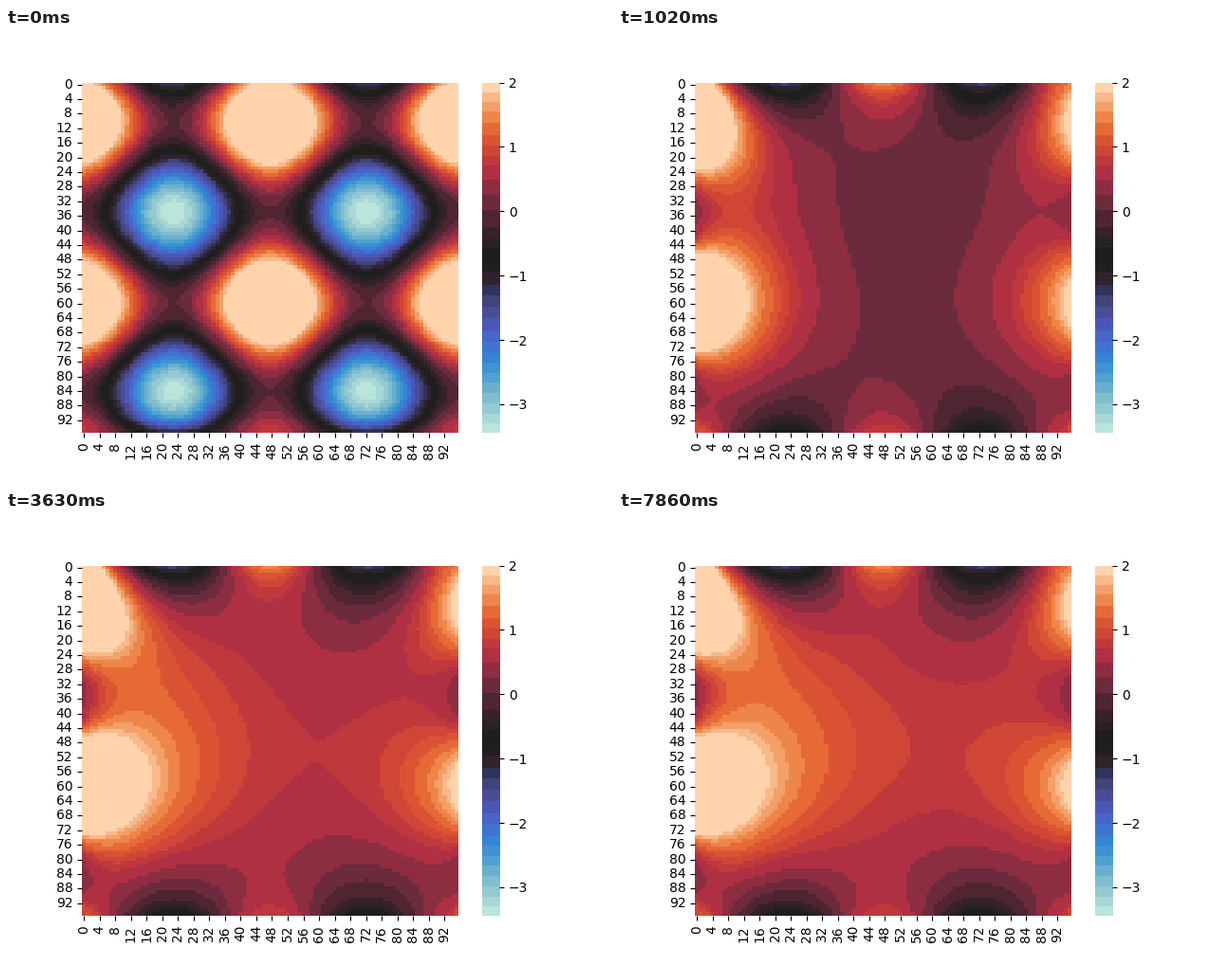
A matplotlib script that plays this animation: 640x480 px, repeating every 8000 ms.

```python
import numpy as np
import matplotlib.pyplot as plt
from matplotlib.animation import FuncAnimation
from matplotlib.colors import BoundaryNorm, ListedColormap

N = 96
VMIN, VMAX = -3.445, 2.0
LOOP_MS, INTERVAL, STEP_MS, LAST_STEP = 8000, 40, 30, 262
DIFFUSION, SUBSTEPS = 9.3, 40

COLORS = """b9e5da a8d8d5 94c9d0 7fbdcf 68b0ce 4fa2cf 3c94d1 3485d3 3f75d0
4866c8 4b57b7 494d98 42437a 30325a 30232b 231f21 1e1e1e 2a2125 36222a 4e2530
6b2b3c 8c2d41 b03043 bf383c d04636 da5433 e56a36 ee8649 f3a06a f9b98a
ffd4ac""".split()
EDGES = [VMIN, -3.3, -3.15, -2.99, -2.83, -2.67, -2.51, -2.35, -2.2, -2.03,
         -1.85, -1.66, -1.48, -1.31, -1.15, -0.95, -0.85, -0.55, -0.42, -0.25,
         0.02, 0.25, 0.49, 0.71, 0.86, 1.02, 1.18, 1.38, 1.55, 1.7, 1.84, VMAX]
# One edge more than colours is needed
assert len(EDGES) == len(COLORS) + 1

cells = np.arange(N)
phase = 4 * np.pi * (cells + 2) / 99
wave_x, wave_y = np.cos(phase), np.sin(phase)
from_end = N - 1 - cells

# Values the four sides settle to
LEFT = 2.5 + 2.5 * wave_y - 0.35 * np.cos(2 * phase)
LEFT *= 1 - 0.35 * np.exp(-from_end / 4)
RIGHT = 1.2 + 0.9 * wave_y
TOP = 0.05 + 1.37 * wave_x + 1.2 * np.exp(-(cells / 7) ** 2)
BOTTOM = 0.05 + 0.8 * wave_x + 0.25 * np.exp(-(cells / 5) ** 2)


def initial_field():
    u = 1.72 * (wave_x[None, :] + wave_y[:, None])
    u *= (1 - 0.4 * np.exp(-from_end / 3))[:, None]
    return u


def set_sides(u, start, settle):
    for side, goal in (
        (np.s_[0, :], TOP),
        (np.s_[-1, :], BOTTOM),
        (np.s_[:, -1], RIGHT),
        (np.s_[:, 0], LEFT),
    ):
        u[side] = goal + (start[side] - goal) * settle


def solve():
    """Heat equation, one stored field per step."""
    start = initial_field()
    u = start.copy()
    rate = DIFFUSION / SUBSTEPS
    fields = [u.copy()]
    for step in range(LAST_STEP):
        for sub in range(SUBSTEPS):
            set_sides(u, start, np.exp(-(step + sub / SUBSTEPS) / 2))
            u[1:-1, 1:-1] += rate * (
                u[:-2, 1:-1] + u[2:, 1:-1] + u[1:-1, :-2] + u[1:-1, 2:]
                - 4 * u[1:-1, 1:-1]
            )
        fields.append(u.copy())
    return fields


fields = solve()
cmap = ListedColormap(["#" + c for c in COLORS])
norm = BoundaryNorm(EDGES, cmap.N)
style = dict(cmap=cmap, norm=norm, aspect="auto", interpolation="nearest")


def shown(u):
    return np.clip(u, VMIN + 1e-6, VMAX - 1e-6)


plt.rcParams["font.family"] = "DejaVu Sans"
fig = plt.figure(figsize=(6.4, 4.8), dpi=100, facecolor="white")

ax = fig.add_axes([0.125, 0.11, 0.62, 0.77])
heat = ax.imshow(shown(fields[0]), extent=(0, N, N, 0), **style)
ticks = np.arange(0, N, 4)
ax.set_xticks(ticks + 0.5, ticks, rotation=90)
ax.set_yticks(ticks + 0.5, ticks, va="center")

bar = fig.add_axes([0.78375, 0.11, 0.028875, 0.77])
ramp = np.linspace(VMIN, VMAX, 740)[:, None]
bar.imshow(shown(ramp), extent=(0, 1, VMIN, VMAX), origin="lower", **style)
bar.set_xticks([])
bar.set_yticks(range(-3, 3))
bar.yaxis.tick_right()

for a in (ax, bar):
    a.spines[:].set_visible(False)


def update(i):
    step = (i * INTERVAL + INTERVAL // 2) // STEP_MS
    heat.set_data(shown(fields[min(step, LAST_STEP)]))
    return (heat,)


anim = FuncAnimation(fig, update, frames=LOOP_MS // INTERVAL,
                     interval=INTERVAL, repeat=True, repeat_delay=0)
plt.show()
```
